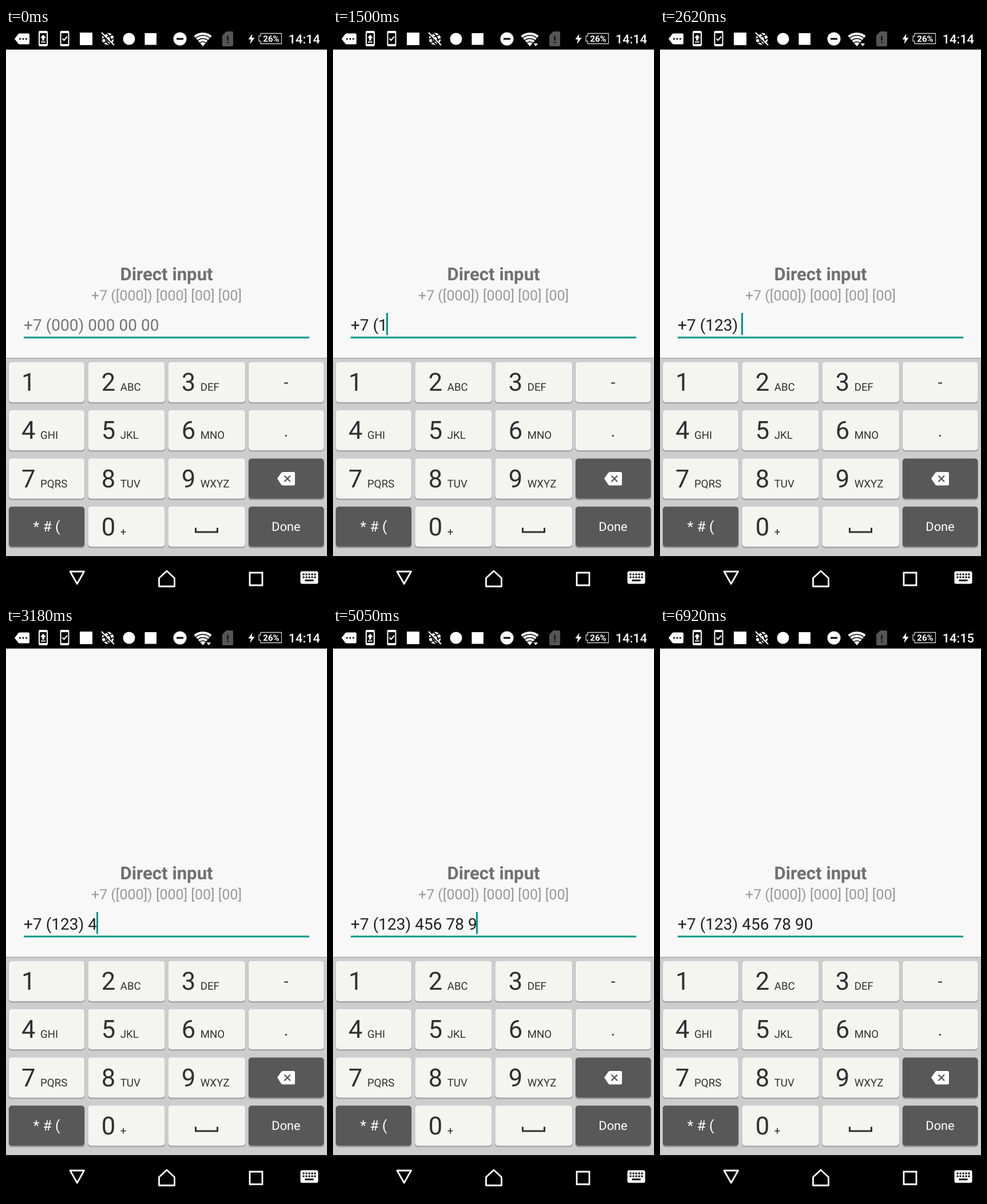
An HTML page with a canvas that plays this animation: 561x998 px, repeating every 7.29 s.

```html
<!DOCTYPE html>
<html lang="en">
<head>
<meta charset="utf-8">
<title>Direct input</title>
<style>
  html, body { margin: 0; width: 100%; height: 100%; overflow: hidden; background: #000; }
  canvas { display: block; width: 100%; height: 100%; }
</style>
</head>
<body>
<canvas id="stage" width="561" height="998"></canvas>
<script>
const ctx = document.getElementById('stage').getContext('2d');
const LOOP = 7290;
const TEAL = '#009688', INK = '#303030', DARK = '#585858';
const FONT = 'Roboto, "Noto Sans", sans-serif';

const COLS = [[5, 132], [143.5, 134], [283.5, 134.5], [424, 131.5]];
const ROWS = [584, 668, 752.5, 836.5];
const KEY_H = 70;
const LETTERS = ['', 'ABC', 'DEF', 'GHI', 'JKL', 'MNO', 'PQRS', 'TUV', 'WXYZ'];

// Time at which each digit of 1234567890 lands; its key goes down one tick before.
const DIGITS = '1234567890';
const TYPED = [1500, 1870, 2430, 2990, 3560, 3930, 4300, 4680, 5050, 5610];
const PRESS = 187;
const CURSOR_OFF = [[0, 560], [940, 1310], [5990, 6360], [6920, LOOP]];

// Fractional glyph advances, so that text widths are not rounded to whole pixels.
ctx.textRendering = 'geometricPrecision';

const within = (t, [a, b]) => t >= a && t < b;

function text(s, x, y, size, color, align = 'left', weight = 400) {
  ctx.font = `${weight} ${size}px ${FONT}`;
  ctx.textAlign = align;
  ctx.fillStyle = color;
  ctx.fillText(s, x, y);
}

function rect(x, y, w, h, color) {
  ctx.fillStyle = color;
  ctx.fillRect(x, y, w, h);
}

function round(x, y, w, h, r, color) {
  ctx.beginPath();
  ctx.roundRect(x, y, w, h, r);
  ctx.fillStyle = color;
  ctx.fill();
}

function disc(x, y, r, color) {
  ctx.beginPath();
  ctx.arc(x, y, r, 0, Math.PI * 2);
  ctx.fillStyle = color;
  ctx.fill();
}

function fill(d, color) {
  ctx.fillStyle = color;
  ctx.fill(new Path2D(d));
}

function line(d, color, width) {
  ctx.strokeStyle = color;
  ctx.lineWidth = width;
  ctx.stroke(new Path2D(d));
}

function phone(x, mark) {
  ctx.beginPath();
  ctx.roundRect(x + 1, 6, 14, 25, 2);
  ctx.strokeStyle = '#fff';
  ctx.lineWidth = 2;
  ctx.stroke();
  rect(x + 1, 5, 14, 4, '#fff');
  rect(x + 1, 28, 14, 4, '#fff');
  ctx.save();
  ctx.translate(x, 0);
  mark();
  ctx.restore();
}

function globe() {
  ctx.save();
  ctx.translate(178, 19);
  disc(0, 0, 10.5, '#fff');
  ctx.rotate(-0.4);
  line('M-10-3.5H10M-10 3.5H10', '#000', 2);
  ctx.beginPath();
  ctx.ellipse(0, 0, 4.5, 10, 0, 0, Math.PI * 2);
  ctx.stroke();
  ctx.rotate(0.4);
  line('M-11-9L10 12', '#000', 2.5);
  line('M-11-11L11 11', '#fff', 2.2);
  ctx.restore();
}

function wifi(active) {
  ctx.save();
  ctx.beginPath();
  ctx.moveTo(344, 32);
  ctx.lineTo(327, 12);
  ctx.lineTo(327, 5);
  ctx.lineTo(361, 5);
  ctx.lineTo(361, 12);
  ctx.closePath();
  ctx.clip();
  disc(344, 32, 24, '#fff');
  ctx.strokeStyle = '#000';
  ctx.lineWidth = 1.5;
  for (const r of [8, 13.5, 19]) {
    ctx.beginPath();
    ctx.arc(344, 32, r, Math.PI, 0);
    ctx.stroke();
  }
  ctx.restore();
  if (active) {
    fill('M349 25H360V33H349Z', '#000');
    fill('M350.5 27H358L354.2 32Z', '#fff');
  }
}

function statusBar(t) {
  rect(0, 0, 561, 37.5, '#000');
  fill('M15 19L21.5 10.5Q22.5 9.5 24 9.5H39Q41 9.5 41 11.5V26.5Q41 28.5 39 28.5H24Q22.5 28.5 21.5 27.5Z', '#fff');
  for (const x of [24.5, 30, 35.5]) disc(x, 19, 1.6, '#000');
  phone(57, () => {
    fill('M8 11.5L13 17.5H9.8V22H6.2V17.5H3Z', '#fff');
    line('M4 24.5H12', '#fff', 2);
  });
  phone(94.5, () => line('M4 18.5L7 21.5L12.5 15', '#fff', 2));
  rect(129, 8, 22, 22, '#fff');
  globe();
  disc(215, 19, 10.5, '#fff');
  rect(242.5, 9, 20.5, 20.5, '#fff');
  disc(304, 19, 11.5, '#fff');
  rect(298, 17.5, 12, 3, '#000');
  wifi(within(t, [1310, 5990]));
  fill('M385 6H395Q397 6 397 8V30Q397 32 395 32H380Q378 32 378 30V13Z', '#555');
  rect(386.3, 14, 2.6, 8, '#151515');
  rect(386.3, 24, 2.6, 2.6, '#151515');
  fill('M430.5 10L423.5 20H428L426.5 28L434.5 17H429.5Z', '#fff');
  line('M445 9.5H481.5V27.5H445V23H442V14H445Z', '#ccc', 1.3);
  text('26%', 463.5, 24, 15, '#fff', 'center', 700);
  text(t < 5610 ? '14:14' : '14:15', 549, 27, 21.8, '#fff', 'right', 500);
}

// The mask adds its own punctuation around the typed digits.
function masked(n) {
  const d = DIGITS.slice(0, n);
  let s = '+7 (' + d.slice(0, 3);
  if (n >= 3) s += ') ' + d.slice(3, 6);
  if (n >= 6) s += ' ' + d.slice(6, 8);
  if (n >= 8) s += ' ' + d.slice(8);
  return s;
}

function form(t) {
  rect(0, 37.5, 561, 540, '#f8f8f8');
  text('Direct input', 280.5, 440.5, 31.16, '#707070', 'center', 700);
  text('+7 ([000]) [000] [00] [00]', 280.5, 476, 24.93, '#999', 'center');
  const n = TYPED.filter(at => t >= at).length;
  const value = n ? masked(n) : '';
  text(value || '+7 (000) 000 00 00', 31, 529, 28.05, n ? '#212121' : '#757575');
  rect(31, 539.5, 499, 3, TEAL);
  if (!CURSOR_OFF.some(span => within(t, span))) {
    const end = 31 + ctx.measureText(value).width;
    rect(Math.round(end - 1.5), 498, 3, 38.5, TEAL);
  }
}

function key(col, row, dark, down) {
  const [x, w] = COLS[col], y = ROWS[row];
  if (!down) {
    round(x - 0.5, y + 1, w + 1, KEY_H + 1.5, 5, dark ? '#999' : '#a6a6a6');
  }
  round(x, y, w, KEY_H, 5, down ? '#d8d8d7' : dark ? DARK : '#f4f4f1');
}

function digitKey(col, row, digit, letters, down) {
  key(col, row, false, down);
  const x = [27, 166.7, 306.7][col], base = ROWS[row] + 50;
  text(digit, x, base, 43.6, INK);
  text(letters, x + 33, base, 18.7, INK);
}

function keyboard(t) {
  rect(0, 577, 561, 346, '#cdcdcd');
  rect(0, 576.5, 561, 1.5, '#a8a8a8');
  const at = TYPED.findIndex(time => within(t, [time - PRESS - 4, time]));
  const down = DIGITS[at];
  LETTERS.forEach((letters, i) => {
    const digit = String(i + 1);
    digitKey(i % 3, Math.floor(i / 3), digit, letters, digit === down);
  });
  digitKey(1, 3, '0', '+', down === '0');

  key(3, 0);
  text('-', 489.5, 629, 28, INK, 'center');
  key(3, 1);
  text('.', 489.5, 714, 28, INK, 'center');
  key(3, 2, true);
  fill('M474 787.5L481 777.5Q482.3 776 484 776H502.5Q505 776 505 778.5V797Q505 799.5 502.5 799.5H484Q482.3 799.5 481 798Z', '#fff');
  line('M486.5 782.5L497 793M497 782.5L486.5 793', DARK, 2.4);
  key(0, 3, true);
  text('* # (', 71, 880, 25, '#fff', 'center');
  key(2, 3);
  line('M331.5 873.5V881H369.5V873.5', INK, 3);
  key(3, 3, true);
  text('Done', 489.5, 879, 21.8, '#fff', 'center');
}

function navBar() {
  rect(0, 923, 561, 75, '#000');
  ctx.lineJoin = 'round';
  line('M112 950H136.5L124.3 971.5Z', '#fff', 2.8);
  line('M281 949L267.5 961.5V976H294.5V961.5Z', '#fff', 2.8);
  ctx.lineJoin = 'miter';
  line('M426 952H448V974H426Z', '#fff', 2.8);
  round(514.5, 949.5, 31, 22, 3, '#fff');
  for (let row = 0; row < 2; row++) {
    for (let i = 0; i < 5; i++) rect(518.5 + i * 5, 953.5 + row * 5, 3, 3, '#000');
  }
  rect(522.5, 964, 15, 3, '#000');
}

function frame(now) {
  const t = now % LOOP;
  form(t);
  keyboard(t);
  statusBar(t);
  navBar();
  requestAnimationFrame(frame);
}
requestAnimationFrame(frame);
</script>
</body>
</html>
```
